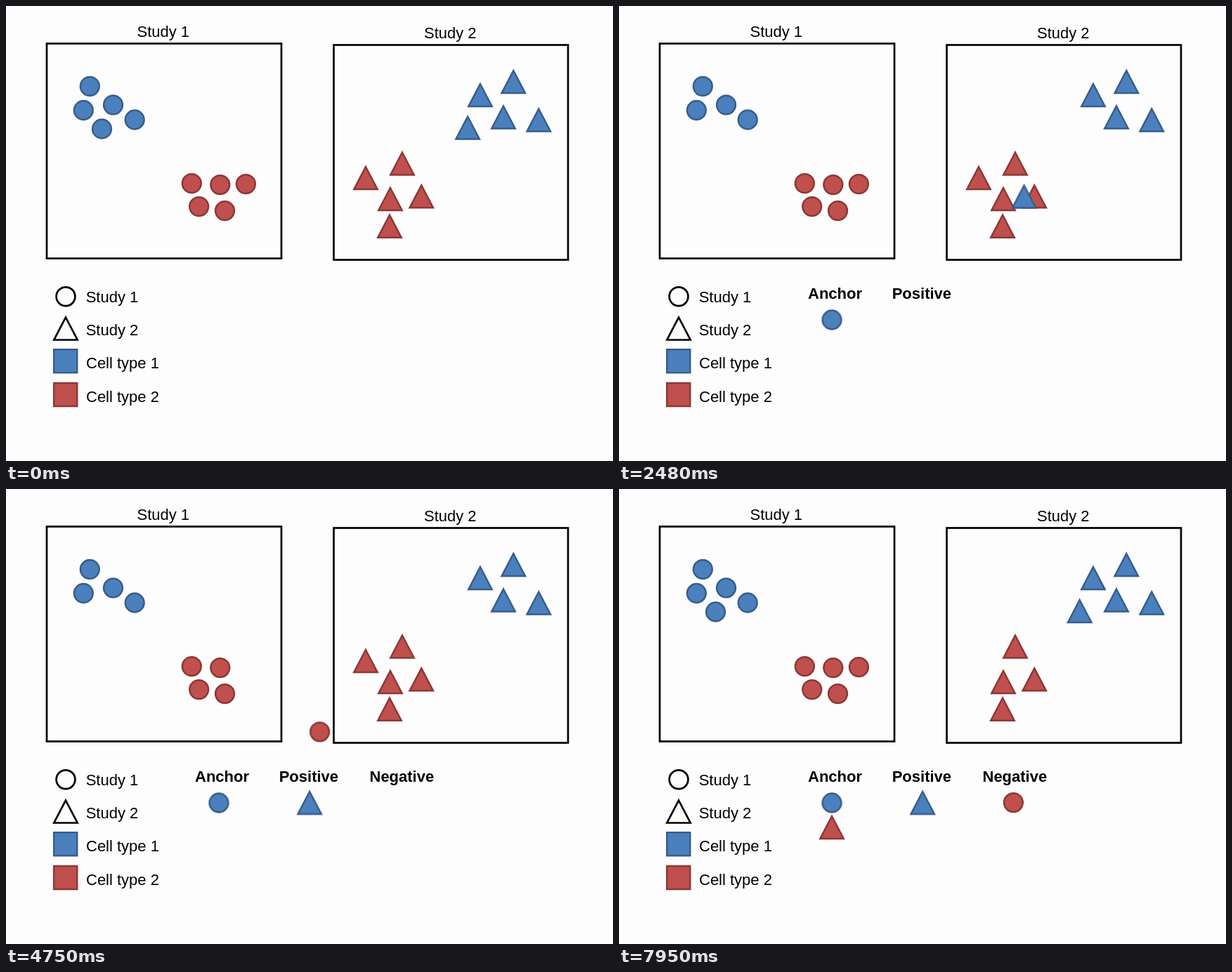
Write an HTML page that moves like this. It is 864x648 px and loops after 7990 ms.

```html
<!DOCTYPE html>
<html lang="en">
<head>
<meta charset="utf-8">
<title>Picking triplets across studies</title>
<style>
  html, body { margin: 0; width: 100%; height: 100%; overflow: hidden; background: #fdfdfd; }
  svg { display: block; width: 864px; height: 648px; }
  text { font: 22px "Liberation Sans", Arial, sans-serif; fill: #000; }
  .bold text { font-weight: bold; }
  .blue { fill: #4a80be; stroke: #385d8a; stroke-width: 2.5; }
  .red { fill: #c0504d; stroke: #8c3836; stroke-width: 2.5; }
  .line { fill: none; stroke: #000; stroke-width: 2.7; }

  .show { animation: 7990ms step-end infinite; }
  .show1 { animation-name: show1; }
  .show2 { animation-name: show2; }
  .show3 { animation-name: show3; }
  .show4 { animation-name: show4; }
  @keyframes show1 { 0% { visibility: hidden } .75%, 100% { visibility: visible } }
  @keyframes show2 { 0% { visibility: hidden } 25.8%, 100% { visibility: visible } }
  @keyframes show3 { 0% { visibility: hidden } 50.9%, 100% { visibility: visible } }
  @keyframes show4 { 0% { visibility: hidden } 76.1%, 100% { visibility: visible } }

  /* Each move speeds up evenly to its midpoint, then slows down evenly. */
  .move {
    --in: cubic-bezier(.3333, 0, .6667, .3333);
    --out: cubic-bezier(.3333, .6667, .6667, 1);
    --half: translate(calc(var(--dx) / 2), calc(var(--dy) / 2));
    --full: translate(var(--dx), var(--dy));
    animation: 7990ms linear infinite;
  }
  .anchor { --dx: 166.5px; --dy: 272px; animation-name: anchor; }
  .positive { --dx: -225px; --dy: 273.5px; animation-name: positive; }
  .negative { --dx: 220px; --dy: 193px; animation-name: negative; }
  .next { --dx: -209px; --dy: 237px; animation-name: next; }
  @keyframes anchor {
    0% { transform: translate(0, 0) }
    1.23% { transform: translate(0, 0); animation-timing-function: var(--in) }
    12.34% { transform: var(--half); animation-timing-function: var(--out) }
    23.44%, 100% { transform: var(--full) }
  }
  @keyframes positive {
    0% { transform: translate(0, 0) }
    26.33% { transform: translate(0, 0); animation-timing-function: var(--in) }
    37.44% { transform: var(--half); animation-timing-function: var(--out) }
    48.55%, 100% { transform: var(--full) }
  }
  @keyframes negative {
    0% { transform: translate(0, 0) }
    51.26% { transform: translate(0, 0); animation-timing-function: var(--in) }
    62.37% { transform: var(--half); animation-timing-function: var(--out) }
    73.48%, 100% { transform: var(--full) }
  }
  @keyframes next {
    0% { transform: translate(0, 0) }
    76.53% { transform: translate(0, 0); animation-timing-function: var(--in) }
    87.64% { transform: var(--half); animation-timing-function: var(--out) }
    98.75%, 100% { transform: var(--full) }
  }
</style>
</head>
<body>
<svg viewBox="0 0 864 648">
  <defs>
    <circle id="dot" r="13.4"/>
    <path id="tri" d="M0-16 16.7 16H-16.7Z"/>
  </defs>

  <g class="blue">
    <use href="#dot" x="119.3" y="114.3"/>
    <use href="#dot" x="110.3" y="148.5"/>
    <use href="#dot" x="152.5" y="140.8"/>
    <use href="#dot" x="183.2" y="162"/>
    <use href="#tri" x="722.3" y="108"/>
    <use href="#tri" x="675" y="127"/>
    <use href="#tri" x="708" y="158.5"/>
    <use href="#tri" x="758.3" y="162.5"/>
  </g>
  <g class="red">
    <use href="#dot" x="264.3" y="252.6"/>
    <use href="#dot" x="304.8" y="254.6"/>
    <use href="#dot" x="274.7" y="285.6"/>
    <use href="#dot" x="311.5" y="291.6"/>
    <use href="#tri" x="564" y="224.5"/>
    <use href="#tri" x="547" y="275"/>
    <use href="#tri" x="591.3" y="271.3"/>
    <use href="#tri" x="546" y="313.7"/>
  </g>

  <g class="show show4">
    <use class="blue" href="#dot" x="137.5" y="175"/>
    <use class="blue" href="#tri" x="655.7" y="174"/>
    <use class="red" href="#dot" x="341.4" y="253.6"/>
  </g>

  <g class="move anchor"><use class="blue" href="#dot" x="136.5" y="175"/></g>
  <g class="move positive"><use class="blue" href="#tri" x="657.2" y="173.5"/></g>
  <g class="move negative"><use class="red" href="#dot" x="341.4" y="253.6"/></g>
  <g class="move next"><use class="red" href="#tri" x="512" y="245"/></g>

  <g class="line">
    <rect x="58" y="53.5" width="334" height="306"/>
    <rect x="466.5" y="55.5" width="333.5" height="306"/>
    <use href="#dot" x="85" y="413.7"/>
    <use href="#tri" x="85" y="459.5"/>
  </g>
  <rect class="blue" x="68.2" y="489.2" width="33" height="33"/>
  <rect class="red" x="68.2" y="537" width="33" height="33"/>

  <text x="186.5" y="43.5">Study 1</text>
  <text x="595" y="46">Study 2</text>
  <text x="113.7" y="421.5">Study 1</text>
  <text x="113.7" y="468.5">Study 2</text>
  <text x="114" y="516">Cell type 1</text>
  <text x="114" y="563.5">Cell type 2</text>
  <g class="bold">
    <text class="show show1" x="269" y="417">Anchor</text>
    <text class="show show2" x="388.7" y="417">Positive</text>
    <text class="show show3" x="517.5" y="417">Negative</text>
  </g>
</svg>
</body>
</html>
```
